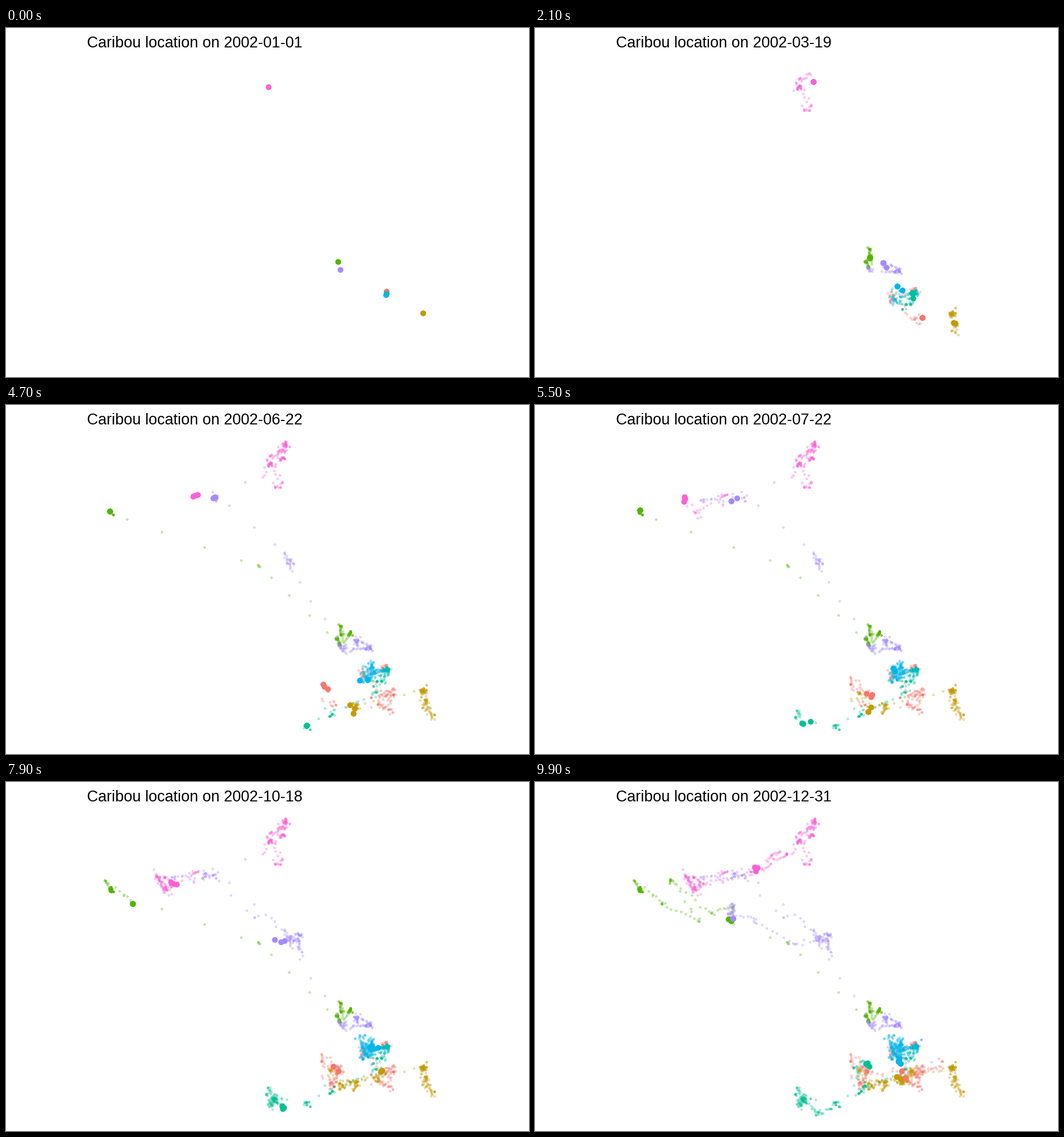
Animation, 917 px wide and 611 px high, one loop 10000 ms. Source, as a matplotlib script:

```python
import numpy as np
import matplotlib.pyplot as plt
from matplotlib.animation import FuncAnimation

W, H, DPI = 917, 611, 64
PX = 72 / DPI
FRAMES, FIXES = 100, 3
TREK = 4  # frames an animal takes to reach its next range
START = np.datetime64("2002-01-01")
plt.rcParams["text.kerning_factor"] = 6  # digits stay evenly spaced

fig = plt.figure(figsize=(W / DPI, H / DPI), dpi=DPI, facecolor="white")
ax = fig.add_axes([0, 0, 1, 1])
ax.set_xlim(-0.5, W - 0.5)
ax.set_ylim(H - 0.5, -0.5)
ax.axis("off")
title = ax.text(141.5, 33.5, "", family="Liberation Sans", size=27 * PX,
                va="baseline", color="black")
herd = []


def home(ranges, t):
    """Centre of the range at time t: stay, then ease over to the next."""
    t0, *here = ranges[0]
    for t1, *there in ranges[1:]:
        if t < t1:
            u = max(0, 1 - (t1 - t) / min(TREK, t1 - t0))
            return np.array(here) + np.subtract(there, here) * u * u * (3 - 2 * u)
        t0, here = t1, there
    return np.array(here, float)


def animal(color, spread, rest, ranges):
    """Random fixes about the home range; with chance rest it stays put."""
    rng = np.random.default_rng(len(herd) + 5)
    offset, days = np.zeros(2), []
    for f in range(FRAMES):
        spots = []
        for k in range(FIXES if f else 1):
            if f and rng.random() > rest:
                offset = rng.normal(0, spread, 2)
            spots.append(home(ranges, f + k / FIXES) + offset)
        days.append(np.round(spots))
    trail = ax.scatter([], [], s=(3.6 * PX) ** 2, c=color, alpha=0.27,
                       linewidths=1.1 * PX, antialiased=False, zorder=1)
    now = ax.scatter([], [], s=(10.2 * PX) ** 2, c=color, linewidths=0,
                     antialiased=False, zorder=2)
    herd.append((days, trail, now))


# ranges: (arrival frame, x, y)
animal("#F8766D", 5, 0.4, [
    (0, 666, 460), (9, 618, 467), (13, 627, 474), (17, 662, 514),
    (21, 678, 502), (31, 650, 514), (38, 674, 535), (42, 664, 527),
    (43, 568, 520), (49, 557, 482), (55, 581, 506), (62, 568, 528),
    (70, 578, 501), (84, 655, 505), (88, 710, 495), (93, 672, 515),
    (99, 638, 512)])

animal("#C49A00", 3.5, 0.4, [
    (0, 730, 498), (17, 738, 532), (21, 732, 515), (28, 744, 545),
    (34, 727, 502), (37, 614, 526), (47, 607, 536), (49, 567, 504),
    (55, 588, 531), (65, 603, 523), (70, 648, 517), (78, 660, 506),
    (88, 643, 524), (99, 638, 513)])

animal("#53B400", 2.2, 0.7, [
    (0, 581, 408), (9, 584, 419), (14, 585, 385), (21, 585, 403),
    (26, 603, 399), (38, 584, 420), (39.5, 583, 420), (41.5, 440, 280),
    (42.3, 440, 280), (44, 183, 188), (76, 174, 172), (79, 222, 211),
    (84, 289, 243), (86, 237, 170), (93, 308, 230), (96, 350, 219),
    (99, 342, 242)])

animal("#00C094", 3.5, 0.45, [
    (0, 666, 464), (9, 628, 475), (13, 650, 483), (21, 666, 465),
    (32, 648, 502), (37, 567, 539), (41.7, 567, 539), (42.3, 525, 562),
    (47.7, 525, 562), (48.3, 456, 540), (55, 471, 556), (63, 463, 564),
    (70, 468, 551), (81, 495, 578), (87, 520, 574), (88, 576, 531),
    (95, 558, 502), (99, 582, 493)])

animal("#00B6EB", 5, 0.4, [
    (0, 665, 466), (12, 628, 474), (21, 638, 456), (35, 640, 474),
    (38, 642, 463), (46, 632, 480), (55, 635, 458), (62, 622, 450),
    (70, 631, 468), (82, 668, 455), (88, 641, 485), (99, 636, 491)])

animal("#A58AFF", 3.5, 0.4, [
    (0, 585, 422), (7, 635, 425), (21, 615, 414), (32, 594, 430),
    (34.5, 589, 426), (36.5, 498, 286), (38, 498, 275), (44.7, 489, 264),
    (46, 366, 158), (51, 290, 168), (55, 349, 162), (59.7, 356, 160),
    (61, 434, 234), (64, 497, 270), (67, 514, 298), (70, 512, 271),
    (81, 458, 287), (84, 385, 243), (88, 342, 227), (94, 344, 217),
    (99, 345, 238)])

animal("#FB61D7", 4, 0.4, [
    (0, 459, 102), (9, 462, 108), (11, 476, 141), (14.5, 476, 141),
    (16, 459, 92), (21, 482, 83), (26, 488, 69), (38, 481, 92),
    (43, 487, 88), (45, 448, 125), (46, 330, 158), (52, 280, 188),
    (55, 261, 163), (62, 277, 186), (70, 275, 167), (77, 290, 178),
    (83, 376, 156), (88, 410, 140), (92, 437, 119), (98, 405, 131),
    (99, 390, 154)])


def draw(i):
    title.set_text(f"Caribou location on {START + i * 364 // (FRAMES - 1)}")
    for days, trail, now in herd:
        trail.set_offsets(np.vstack([np.empty((0, 2))] + days[:i]))
        now.set_offsets(days[i])
    return [title]


anim = FuncAnimation(fig, draw, frames=FRAMES, interval=100,
                     init_func=lambda: draw(0), repeat=True, repeat_delay=0)
plt.show()
```
